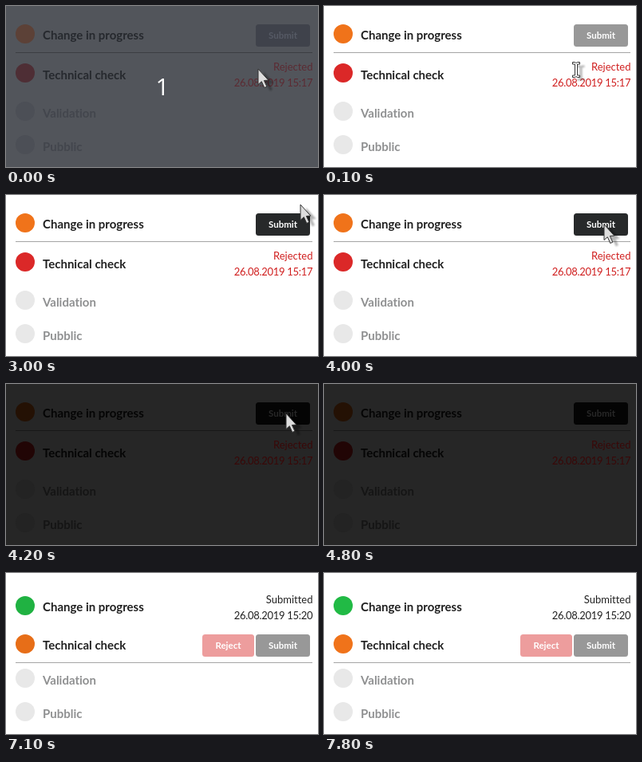
These frames come from a looping animation (391 px wide and 202 px high, 8 s). An HTML page:

```html
<!DOCTYPE html>
<html lang="en">
<head>
<meta charset="utf-8">
<title>Approval steps</title>
<style>
html, body { margin: 0; width: 100%; height: 100%; overflow: hidden; background: #fff; }
svg { display: block; width: 391px; height: 202px; animation: palette 8s step-end infinite; }
text { font-family: Lato, sans-serif; font-size: 13px; font-variant-ligatures: none; }
.bg { fill: var(--bg); }
.title { font-size: 15px; font-weight: 700; fill: var(--ink); }
.mute { fill: var(--mute); }
.end { text-anchor: end; }
.date { letter-spacing: -.3px; }
.bad { fill: var(--bad); }
.ink { fill: var(--ink); }
.line { stroke: var(--line); }
.dot { fill: var(--dot); }
.orange { fill: var(--orange); }
.red { fill: var(--red); }
.green { fill: var(--green); }
.btn { fill: var(--btn); }
.label { font-size: 11.5px; font-weight: 700; text-anchor: middle; fill: var(--label); }
.count { font: 30px "Open Sans", sans-serif; text-anchor: middle; fill: #fff; }

.count, .beam, .before, .after, .submit, .loader, .arrow {
  animation: 8s step-end infinite;
}
.count { animation-name: count; }
.beam { animation-name: beam; }
.before { animation-name: before; }
.after { animation-name: after; }
.submit { animation-name: submit; }
.loader { animation-name: loader; transform-origin: 347px 37px; stroke: var(--label); }
.arrow { animation-name: arrow; }

@keyframes palette {
  0% {
    --bg: #52555b; --ink: #26292e; --mute: #43464d; --dot: #4c4f56;
    --orange: #5c4137; --red: #4e2e35; --bad: #5c2b33; --line: #3c3e43;
    --btn: #3f424b; --label: #565a65; --green: #21ba45;
  }
  1.25% {
    --bg: #fff; --ink: #212121; --mute: #8f9091; --dot: #e8e8e8;
    --orange: #f0731a; --red: #db2828; --bad: #d01f1f; --line: #a5a5a5;
    --btn: #989898; --label: #fff;
  }
  23.75% { --btn: #222324; }
  25% { --btn: #1b1c1d; }
  36.25% { --btn: #27292a; }
  38.75% { --btn: #1b1c1d; }
  50% { --btn: #27292a; }
  52.5% {
    --bg: #262626; --ink: #050505; --mute: #151515; --dot: #232323;
    --orange: #241104; --red: #210505; --bad: #3a0808; --line: #181818;
    --btn: #040404; --label: #282828;
  }
  88.75% {
    --bg: #fff; --ink: #212121; --mute: #8f9091; --dot: #e8e8e8;
    --orange: #e76e18; --red: #db2828; --bad: #d01f1f; --line: #a5a5a5;
    --btn: #989898; --label: #fff; --green: #20b242;
  }
  92.5%, 100% { --orange: #f0731a; --green: #21ba45; }
}
@keyframes count { 0% { visibility: visible; } 1.25%, 100% { visibility: hidden; } }
@keyframes beam {
  0%, 2.5%, 100% { visibility: hidden; }
  1.25% { visibility: visible; }
}
@keyframes before { 0% { opacity: 1; } 88.75%, 100% { opacity: 0; } }
@keyframes after { 0% { opacity: 0; } 88.75%, 100% { opacity: 1; } }
@keyframes submit { 0% { opacity: 1; } 83.75%, 100% { opacity: 0; } }
@keyframes loader {
  0% { opacity: 0; transform: rotate(75deg); }
  83.75% { opacity: 1; transform: rotate(75deg); }
  85% { transform: rotate(135deg); }
  86.25% { transform: rotate(195deg); }
  87.5% { transform: rotate(255deg); }
  88.75%, 100% { opacity: 0; transform: rotate(315deg); }
}
@keyframes arrow {
  0% { visibility: visible; transform: translate(316px, 79px); }
  1.25% { visibility: hidden; }
  33.75% { visibility: visible; transform: translate(344px, 17px); }
  36.25% { transform: translate(358px, 18px); }
  37.5% { transform: translate(369px, 12px); }
  38.75% { visibility: hidden; }
  50% { visibility: visible; transform: translate(351px, 37px); }
  58.75% { transform: translate(174px, 15px); }
  60% { visibility: hidden; }
  96.25% { visibility: visible; transform: translate(17px, 119px); }
  97.5%, 100% { visibility: hidden; transform: translate(17px, 119px); }
}
</style>
</head>
<body>
<svg viewBox="0 0 391 202">
  <defs>
    <path id="tip" d="M0 0V19.5l4.3-3.8 3.5 7.8 3.1-1.4-3.5-7.6 5.4-.4z"/>
    <path id="bar" d="M-4.5-9.5H-1.5L0-8.5 1.5-9.5H4.5V-7H1.5V7H4.5V9.5H1.5L0 8.5-1.5 9.5H-4.5V7H-1.5V-7H-4.5z"/>
    <filter id="soft" x="-50%" y="-50%" width="200%" height="200%">
      <feGaussianBlur stdDeviation="1"/>
    </filter>
  </defs>
  <rect class="bg" width="391" height="202"/>

  <g class="before">
    <circle class="orange" cx="24" cy="35" r="12"/>
    <text class="title" x="46" y="42">Change in progress</text>
    <rect class="btn" x="313" y="23" width="68" height="28" rx="3.5"/>
    <text class="label submit" x="347" y="41">Submit</text>
    <path class="loader" d="M342.4 32.4A6.5 6.5 0 0 1 351.6 32.4" fill="none" stroke-width="1.4"/>
    <path class="line" d="M12 58.5H384"/>
    <circle class="red" cx="24" cy="84" r="12"/>
    <text class="title" x="46" y="92">Technical check</text>
    <text class="end bad" x="384.5" y="81">Rejected</text>
    <text class="end bad date" x="384.2" y="101">26.08.2019 15:17</text>
  </g>

  <g class="after">
    <circle class="green" cx="24" cy="41" r="12"/>
    <text class="title" x="46" y="48">Change in progress</text>
    <text class="end ink" x="384.5" y="38">Submitted</text>
    <text class="end ink date" x="384.2" y="58">26.08.2019 15:20</text>
    <circle class="orange" cx="24" cy="89" r="12"/>
    <text class="title" x="46" y="96">Technical check</text>
    <rect x="246" y="77" width="65" height="28" rx="3.5" fill="#ed9d9d"/>
    <text class="label" x="278.5" y="95">Reject</text>
    <rect class="btn" x="313" y="77" width="68" height="28" rx="3.5"/>
    <text class="label" x="347" y="95">Submit</text>
    <path class="line" d="M12 112.5H384"/>
  </g>

  <circle class="dot" cx="24" cy="132" r="12"/>
  <text class="title mute" x="46" y="140">Validation</text>
  <circle class="dot" cx="24" cy="174" r="12"/>
  <text class="title mute" x="46" y="182">Pubblic</text>

  <text class="count" x="196.2" y="112">1</text>

  <g class="beam">
    <use href="#bar" x="322" y="84" opacity=".3" filter="url(#soft)"/>
    <use href="#bar" x="316" y="80" fill="#fff" stroke="#333"/>
  </g>
  <g class="arrow">
    <use href="#tip" x="7" y="4" opacity=".3" filter="url(#soft)"/>
    <use href="#tip" fill="#ddd" stroke="#333"/>
  </g>
</svg>
</body>
</html>
```
